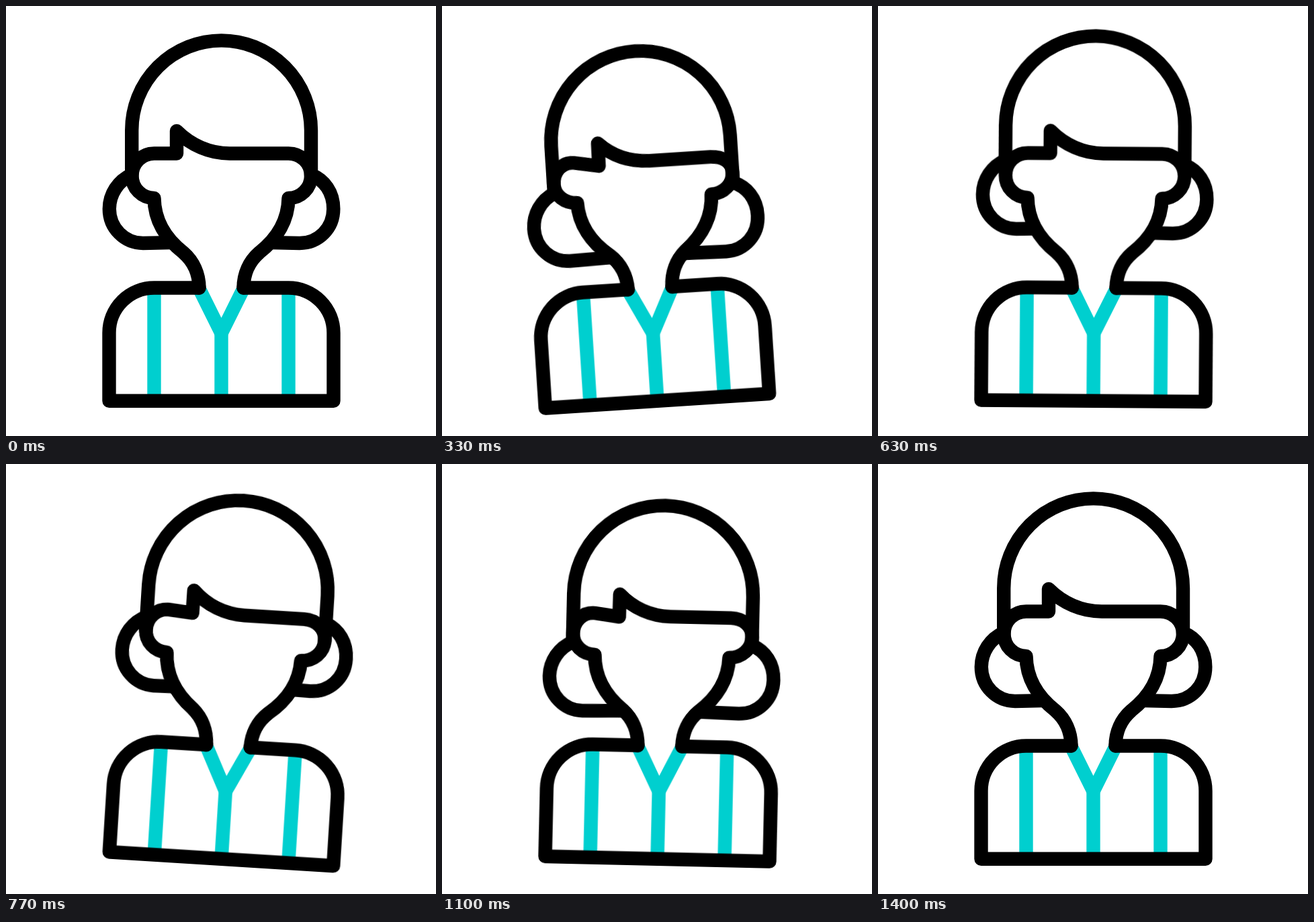
An HTML page for the animation above (2170 ms loop, 640 by 640 pixels).

```html
<!DOCTYPE html>
<html lang="en">
<head>
<meta charset="utf-8">
<title>Swaying figure</title>
<style>
  html, body { margin: 0; width: 100%; height: 100%; overflow: hidden; background: #fff; }
  svg { display: block; width: 100vw; height: 100vh; }

  path { fill: none; stroke: #000; stroke-width: 20.4; stroke-linecap: round; stroke-linejoin: round; }
  .stripe { stroke: #00cfcf; stroke-linecap: butt; stroke-linejoin: bevel; }

  .figure, .hair, .left, .right, .face {
    animation: 2170ms cubic-bezier(.3333, 0, .6667, 1) infinite;
  }
  .figure { animation-name: sway; transform-origin: 320.5px 588px; }
  .hair { animation-name: bob; }
  .left { animation-name: left; }
  .right { animation-name: right; }
  .face {
    animation-name: fringe;
    fill: #fff;
    d: path("M287.5 419.5 C287.5 399 279 380 264 367 C237 346 221 318 220.5 286 C202 286 187.5 271 187.5 252.7 C187.5 234 202 219.5 220.5 219.5 L254 219.5 L254 186 C275 207 303 219.5 333 219.5 L420.5 219.5 C439 219.5 454 234 454 252.7 C454 271 439 286 420.5 286 C420 318 404 346 377 367 C362 380 353.5 399 353.5 419.5");
  }

  @keyframes sway {
    0%, 58.37%, 100% { transform: rotate(0deg); }
    18.43% { transform: rotate(-4deg); }
    38.4% { transform: rotate(4deg); }
  }
  @keyframes bob {
    0%, 59.14%, 100% { transform: translateY(0); }
    12.29%, 44.55% { transform: translateY(17px); }
    27.65%, 29.19% { transform: translateY(-6.7px); }
  }
  /* The side curls trail behind the hair, the right one a little more. */
  @keyframes left {
    0%, 63.75%, 100% { transform: translateY(0); }
    13.06% { transform: translateY(20.5px); }
    30.26%, 31.49% { transform: translateY(-21px); }
    49.92% { transform: translateY(17px); }
  }
  @keyframes right {
    0%, 64.5%, 100% { transform: translateY(0); }
    16.9% { transform: translateY(20px); }
    33.8% { transform: translateY(-23.5px); }
    53.76% { transform: translateY(18.5px); }
  }
  /* Only the fringe and the upper ears give way; jaw and neck stay put. */
  @keyframes fringe {
    0%, 27.65%, 29.19%, 59.14%, 100% {
      d: path("M287.5 419.5 C287.5 399 279 380 264 367 C237 346 221 318 220.5 286 C202 286 187.5 271 187.5 252.7 C187.5 234 202 219.5 220.5 219.5 L254 219.5 L254 186 C275 207 303 219.5 333 219.5 L420.5 219.5 C439 219.5 454 234 454 252.7 C454 271 439 286 420.5 286 C420 318 404 346 377 367 C362 380 353.5 399 353.5 419.5");
    }
    12.29%, 44.55% {
      d: path("M287.5 419.5 C287.5 399 279 380 264 367 C237 346 221 318 220.5 286 C202 286 187.5 273 187.5 257 C187.5 239 201 224 219 227 L256.5 234.7 L257 201 C277 221 303 231 331 231.5 L423 231.5 C442 232 454 241 454 255.5 C454 273 439 286 420.5 286 C420 318 404 346 377 367 C362 380 353.5 399 353.5 419.5");
    }
  }
</style>
</head>
<body>
<svg viewBox="0 0 640 640">
  <g class="figure">
    <path class="left" d="M187 251 C167 260 153.8 280 153.8 302 C153.8 331 177 353 204 353 L268 351.6"/>
    <path class="right" d="M454 251 C474 259 487.3 277 487.3 302 C487.3 331 465 353 437 353 L373 351.6"/>
    <path class="stripe" d="M220.5 420 V588 M420.5 420 V588 M320.5 486 V588"/>
    <path class="stripe" d="M287 419.5 L320.5 487 L354 419.5"/>
    <path class="face"/>
    <path class="hair" d="M187.2 253 V185 A133.4 133.6 0 0 1 454 185 V253"/>
    <path d="M287.5 419.5 H220.5 A67 67 0 0 0 153.5 486.5 V587.7 H487.5 V486.5 A67 67 0 0 0 420.5 419.5 H353.5"/>
  </g>
</svg>
</body>
</html>
```
